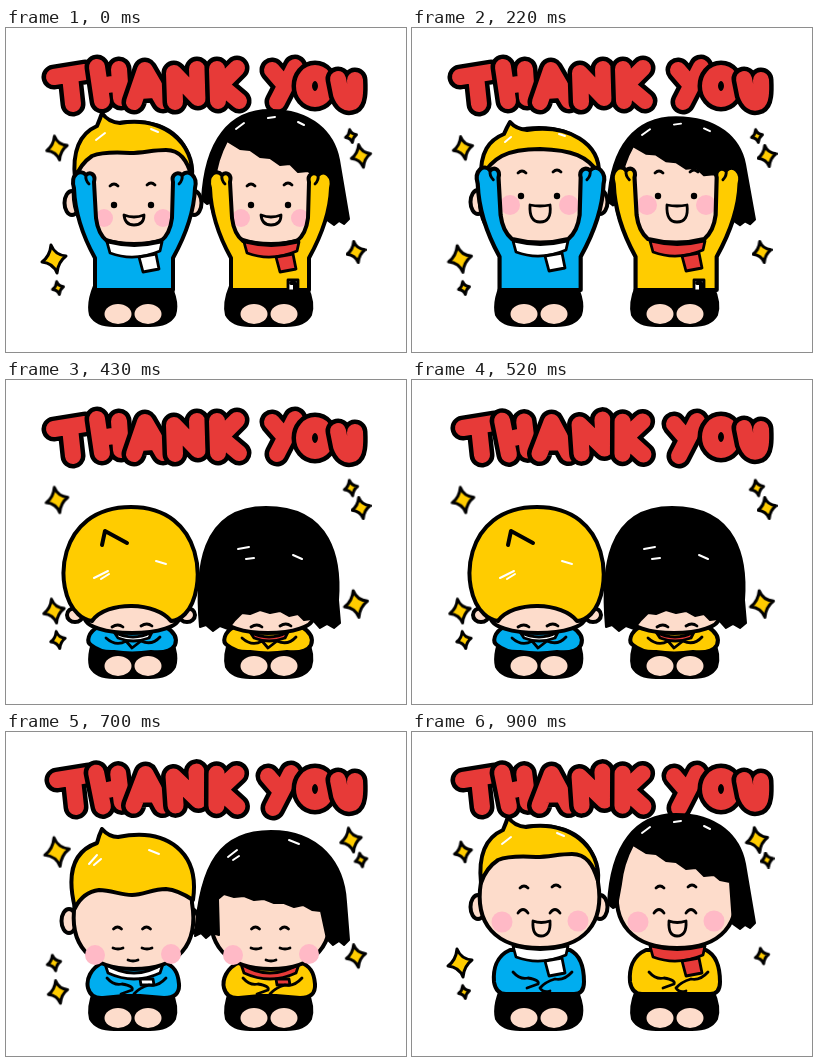
An HTML page without scripts for the animation above (1000 ms loop, 400 by 324 pixels).

```html
<!DOCTYPE html>
<html lang="en">
<head>
<meta charset="utf-8">
<title>Thank you</title>
<style>
html, body { margin: 0; width: 100%; height: 100%; overflow: hidden; background: #fff; }
svg { display: block; width: 100vw; height: 100vh; }
.ink { stroke: #000; stroke-width: 4; stroke-linecap: round; stroke-linejoin: round; }
.line { fill: none; }
.thin { stroke-width: 2.8; }
.skin { fill: #fddccb; }
.hair { fill: #fc0; }
.dark { fill: #000; stroke-width: 2; }
.pink { fill: #ffb9c6; stroke: none; }
.shine { fill: none; stroke: #fff; stroke-width: 2; }
.coat { fill: var(--coat); }
.scarf { fill: var(--scarf); }
.boy { --coat: #00adef; --scarf: #fff; }
.girl { --coat: #fc0; --scarf: #e73a38; }
.word { fill: none; stroke-linecap: round; stroke-linejoin: round; }
.edge { stroke: #000; stroke-width: 25; }
.fill { stroke: #e73a38; stroke-width: 16; }
#spark { fill: #fc0; stroke: #000; stroke-width: 3; stroke-linejoin: round; vector-effect: non-scaling-stroke; }

.pose, .word, .star { animation: 1s step-end infinite; }
.pose, .word { visibility: hidden; }
.up { animation-name: up; }
.cheer { animation-name: cheer; }
.half { animation-name: half; }
.bow { animation-name: bow; }
.smile { animation-name: smile; }
.even { animation-name: even; }
.odd { animation-name: odd; }
.star { animation-name: twinkle; }
@keyframes up { 0% { visibility: visible; } 22%, 100% { visibility: hidden; } }
@keyframes cheer { 0%, 34%, 100% { visibility: hidden; } 22% { visibility: visible; } }
@keyframes half { 0%, 43%, 80%, 100% { visibility: hidden; } 34%, 70% { visibility: visible; } }
@keyframes bow { 0%, 70%, 100% { visibility: hidden; } 43% { visibility: visible; } }
@keyframes smile { 0% { visibility: hidden; } 80%, 100% { visibility: visible; } }
@keyframes even {
  0%, 22%, 43%, 61%, 80% { visibility: visible; }
  10%, 34%, 52%, 70%, 90%, 100% { visibility: hidden; }
}
@keyframes odd {
  0%, 22%, 43%, 61%, 80% { visibility: hidden; }
  10%, 34%, 52%, 70%, 90%, 100% { visibility: visible; }
}
@keyframes twinkle {
  0% { transform: scale(var(--up)); }
  22% { transform: scale(var(--cheer)); }
  34%, 70% { transform: scale(var(--half)); }
  43% { transform: scale(var(--bow)); }
  80%, 100% { transform: scale(var(--smile)); }
}
</style>
</head>
<body>
<svg viewBox="0 0 400 324" role="img" aria-label="THANK YOU">
<defs>
  <path id="t" d="M48 49L79 44M64 48L67 76"/>
  <path id="h" d="M91 39L96 73M113 41L115 70M95 58L113 55"/>
  <path id="a" d="M128 74L139 42L157 73M133 63L148 62"/>
  <path id="n" d="M169 74L168 45L192 70L191 41"/>
  <path id="k" d="M211 41L212 73M231 40L214 57L233 73"/>
  <path id="y" d="M266 42L278 56M289 39L271 74"/>
  <ellipse id="o" cx="309" cy="58" rx="11" ry="13"/>
  <path id="u" d="M332 51L335 66Q339 77 346 74Q350 72 349 52"/>
  <g id="T"><use class="edge" href="#t"/><use class="fill" href="#t"/></g>
  <g id="H"><use class="edge" href="#h"/><use class="fill" href="#h"/></g>
  <g id="A"><use class="edge" href="#a"/><use class="fill" href="#a"/></g>
  <g id="N"><use class="edge" href="#n"/><use class="fill" href="#n"/></g>
  <g id="K"><use class="edge" href="#k"/><use class="fill" href="#k"/></g>
  <g id="Y"><use class="edge" href="#y"/><use class="fill" href="#y"/></g>
  <g id="O"><use class="edge" href="#o"/><use class="fill" href="#o"/></g>
  <g id="U"><use class="edge" href="#u"/><use class="fill" href="#u"/></g>

  <g id="legs">
    <path class="ink dark" d="M88 258H165Q173 275 169 287Q163 298 144 298H108Q90 298 84 287Q81 275 88 258Z"/>
    <ellipse class="skin" cx="112" cy="286" rx="13.5" ry="10"/>
    <ellipse class="skin" cx="142" cy="286" rx="13.5" ry="10"/>
  </g>

  <g id="ears">
    <ellipse class="ink skin" cx="66" cy="175" rx="7.5" ry="12"/>
    <ellipse class="ink skin" cx="188" cy="175" rx="7.5" ry="12"/>
  </g>
  <path id="head" class="ink skin" d="M69 150C69 110 95 94 127 94C165 94 186 115 186 150C193 192 172 216 128 216C84 216 62 192 69 150Z"/>

  <g id="raised">
    <path class="ink coat" d="M68 160C64 147 74 140 80 147C85 143 90 147 88 154L90 190Q92 206 101 213Q128 220 155 213Q164 206 166 190L167 154C165 147 171 143 176 147C183 140 192 149 189 160C188 188 177 212 167 230V262H89V230C79 212 69 188 68 160Z"/>
    <path class="ink line thin" d="M80 147Q79 152 83 156M176 147Q177 152 173 156"/>
  </g>
  <g id="scarf" class="ink scarf thin">
    <path d="M101 214Q128 221 156 214L154 223Q128 234 104 225Z"/>
    <path d="M133 229L150 226L153 241L137 244Z"/>
  </g>
  <path id="hug" class="ink line thin" d="M101 240Q108 248 116 246Q128 248 126 252L115 256M160 240Q152 249 143 247Q133 250 128 256Q131 261 138 259"/>
  <path id="brow" class="ink line thin" d="M-4 1Q0-3 4 1"/>

  <g id="calmFace">
    <g class="pink"><circle cx="98" cy="190" r="9"/><circle cx="157" cy="190" r="9"/></g>
    <use href="#brow" x="108" y="157"/><use href="#brow" x="145" y="156"/>
    <circle cx="108" cy="177" r="3.2"/><circle cx="145" cy="177" r="3.2"/>
    <path class="ink skin thin" d="M118 187Q128 191 138 187Q138 197 128 197Q119 197 118 187Z"/>
  </g>
  <g id="cheerFace">
    <g class="pink"><circle cx="98" cy="177" r="10"/><circle cx="157" cy="177" r="10"/></g>
    <use href="#brow" x="110" y="144"/><use href="#brow" x="145" y="143"/>
    <circle cx="109" cy="168" r="3.2"/><circle cx="145" cy="168" r="3.2"/>
    <path class="ink skin thin" d="M118 177Q128 179 138 177Q140 194 128 194Q117 194 118 177Z"/>
  </g>
  <g id="smileFace">
    <g class="pink"><circle cx="90" cy="190" r="10.5"/><circle cx="166" cy="189" r="10.5"/></g>
    <use href="#brow" x="112" y="155"/><use href="#brow" x="144" y="154"/>
    <path class="ink line thin" d="M106 181Q111 174 116 181M138 181Q143 174 148 181"/>
    <path class="ink skin thin" d="M121 189Q129 192 138 189Q139 204 129 204Q120 204 121 189Z"/>
  </g>
  <g id="halfFace">
    <g class="pink"><circle cx="89" cy="223" r="10"/><circle cx="165" cy="222" r="10"/></g>
    <use href="#brow" x="111.5" y="196"/><use href="#brow" x="140.5" y="196"/>
    <path class="ink line thin" d="M107 216Q112 218 117 216M136 216Q141 218 146 216M122 228Q127 230 132 228"/>
  </g>
  <path id="bowFace" class="ink line thin" d="M106 247Q112 243 117 247M135 246Q141 242 146 246"/>

  <g id="hugBody">
    <path class="ink coat" d="M98 218C84 224 81 238 82 250Q84 262 94 262H162Q172 262 172 250C172 236 168 223 158 218Z"/>
    <use href="#hug"/>
  </g>
  <g id="halfBody">
    <path class="ink coat" d="M98 230C84 236 80 248 82 256Q85 267 97 266L118 264H134L158 266Q174 266 173 252C172 240 168 234 158 230Z"/>
    <g class="ink scarf thin">
      <path d="M99 232Q128 250 157 232L154 241Q128 253 102 241Z"/>
      <path d="M134 247H147L148 253H135Z"/>
    </g>
    <use href="#hug" y="6"/>
  </g>
  <g id="bowBody">
    <path class="ink coat" d="M92 247C82 252 80 262 85 265Q95 273 108 272Q126 275 145 272Q164 274 169 265Q173 255 160 247Z"/>
    <path class="ink line thin" d="M100 258Q110 267 120 261L126 268L135 261Q146 266 154 257"/>
    <path class="ink scarf thin" d="M108 252Q127 262 146 252L143 258Q127 264 112 258Z"/>
  </g>

  <g id="boyHair">
    <path class="ink hair" d="M69 151C66 122 75 105 91 98Q94 91 96 85Q102 94 114 95C158 88 189 116 186 149C181 132 174 122 160 122C146 122 138 125 124 125C108 124 96 124 86 128Q74 136 69 151Z"/>
    <path class="ink shine" d="M90 112L99 105M145 101L152 104"/>
  </g>
  <g id="girlHair">
    <path class="ink dark" d="M196 172C199 112 224 82 264 82C306 82 328 105 333 132L343 191L338 196L333 193L328 197L321 192L318 150L308 148L302 143L292 144L284 136L274 137L264 130L254 129L244 122L234 121L221 113Q211 132 209 152L205 174L201 176Z"/>
    <path class="ink shine" d="M230 101L238 95M262 90L269 89M292 94L298 97"/>
  </g>
  <g id="badge"><path class="ink thin" fill="#fff" d="M282 252H292V263H282Z"/><path class="ink line" stroke-width="1" d="M285 255H289V262"/></g>
  <path id="spark" d="M-3-14Q1-4 12-3Q4 3 3 14Q-1 4-12 3Q-4-3-3-14Z"/>
</defs>

<g class="word even">
  <use href="#T"/><use href="#H"/><use href="#A"/><use href="#N"/>
  <use href="#K"/><use href="#Y"/><use href="#O"/><use href="#U"/>
</g>
<g class="word odd">
  <use href="#T" transform="translate(3 -1)"/>
  <use href="#H" transform="translate(0 1) rotate(-3 104 56)"/>
  <use href="#A" transform="rotate(2 140 60)"/>
  <use href="#N" transform="translate(0 -1) rotate(-2 180 58)"/>
  <use href="#K" transform="translate(-1 1) rotate(2 220 57)"/>
  <use href="#Y" transform="translate(-4 2)"/>
  <use href="#O" transform="translate(0 -1)"/>
  <use href="#U" transform="translate(0 -3)"/>
</g>

<g transform="translate(51 120)"><use href="#spark" class="star" style="--up:.85;--cheer:.8;--half:1.02;--bow:.9;--smile:.7"/></g>
<g transform="translate(345 108)"><use href="#spark" class="star" style="--up:.45;--cheer:.45;--half:.85;--bow:.55;--smile:.88"/></g>
<g transform="translate(355 128)"><use href="#spark" class="star" style="--up:.8;--cheer:.75;--half:.48;--bow:.75;--smile:.5"/></g>
<g transform="translate(350 224)"><use href="#spark" class="star" style="--up:.75;--cheer:.75;--half:.8;--bow:.95;--smile:.55"/></g>
<g transform="translate(48 231)"><use href="#spark" class="star" style="--up:1;--cheer:.95;--half:.55;--bow:.85;--smile:1"/></g>
<g transform="translate(52 260)"><use href="#spark" class="star" style="--up:.45;--cheer:.45;--half:.8;--bow:.6;--smile:.45"/></g>

<use href="#legs"/>
<use href="#legs" x="136"/>

<g class="pose up">
  <g class="boy">
    <use href="#ears"/><use href="#head"/><use href="#boyHair"/><use href="#calmFace"/>
    <use href="#raised"/><use href="#scarf"/>
  </g>
  <g class="girl">
    <use href="#head" x="137"/><use href="#girlHair"/><use href="#calmFace" x="137"/>
    <use href="#raised" x="136"/><use href="#scarf" x="137"/><use href="#badge"/>
  </g>
</g>

<g class="pose cheer">
  <g class="boy">
    <use href="#ears" y="-1"/><use href="#head" y="6"/>
    <path class="ink hair" d="M69 150C68 124 77 112 92 106Q95 99 98 94Q104 101 115 102C158 96 188 116 187 146C176 128 160 122 128 121C94 121 80 130 69 150Z"/>
    <path class="ink shine" d="M93 114L99 109M147 106L153 108"/>
    <use href="#cheerFace"/>
    <use href="#raised" transform="translate(-5 -10.5) scale(1.04)"/><use href="#scarf" y="-1"/>
  </g>
  <g class="girl">
    <use href="#head" x="137" y="6"/>
    <use href="#girlHair" transform="translate(0 12) scale(1 .94)"/><use href="#cheerFace" x="137"/>
    <use href="#raised" transform="translate(131 -10.5) scale(1.04)"/><use href="#scarf" x="137" y="-1"/><use href="#badge"/>
  </g>
</g>

<g class="pose half">
  <g class="boy">
    <use href="#halfBody"/>
    <use href="#ears" x="-3" y="14"/><use href="#head" y="21"/>
    <path class="ink hair" d="M69 176C60 140 68 119 91 111Q93 103 96 97Q103 105 112 105C162 95 194 121 187 168Q172 158 160 157C146 157 138 163 126 163C114 163 106 158 93 158Q77 160 69 176Z"/>
    <path class="ink shine" d="M83 132L91 123M88 133L95 127M143 118L153 122"/>
    <use href="#halfFace"/>
  </g>
  <g class="girl">
    <use href="#halfBody" x="136"/>
    <use href="#head" x="137" y="21"/>
    <path class="ink dark" d="M189 204C194 130 215 99 265 99C314 99 338 132 340 170L343 208L338 213L333 209L327 213L321 207L315 179L306 178L297 173L288 175L278 171L268 171L258 167L248 168L238 164L228 165L218 162L212 167L213 203L206 201L200 206L195 201Z"/>
    <path class="ink shine" d="M222 125L231 118M227 128L233 124M283 108L293 112"/>
    <use href="#halfFace" x="138"/>
  </g>
</g>

<g class="pose bow">
  <g class="boy">
    <use href="#bowBody"/>
    <ellipse class="ink skin" cx="69" cy="235" rx="8" ry="7"/><ellipse class="ink skin" cx="181" cy="235" rx="8" ry="7"/>
    <ellipse class="ink skin" cx="126" cy="238" rx="47" ry="15"/>
    <path class="ink hair" d="M72 234C46 210 50 127 125 127C199 127 202 210 179 234Q172 241 165 241C151 222 101 220 86 241Q78 240 72 234Z"/>
    <path class="ink line" d="M96 165L99 151L121 163"/>
    <path class="ink shine" d="M88 198L102 191M95 199L103 194M150 181L160 184"/>
    <use href="#bowFace"/>
  </g>
  <g class="girl">
    <use href="#bowBody" x="136"/>
    <ellipse class="ink skin" cx="262" cy="238" rx="45" ry="15"/>
    <path class="ink dark" d="M194 247C189 190 194 127 260 127C326 127 335 180 332 220L334 243L328 248L321 244L314 248L306 239L298 240L292 234L283 236L274 231L264 233L254 230L244 234L236 233L229 240L222 249L214 246L207 251L200 245Z"/>
    <path class="ink shine" d="M232 169L243 167M240 179L248 178M287 175L296 179"/>
    <use href="#bowFace" x="139"/>
  </g>
</g>

<g class="pose smile">
  <g class="boy">
    <use href="#hugBody"/><use href="#scarf"/>
    <use href="#ears"/><use href="#head"/><use href="#boyHair"/><use href="#smileFace"/>
  </g>
  <g class="girl">
    <use href="#hugBody" x="136"/><use href="#scarf" x="137"/>
    <use href="#head" x="137"/><use href="#girlHair"/><use href="#smileFace" x="136"/>
  </g>
</g>
</svg>
</body>
</html>
```
